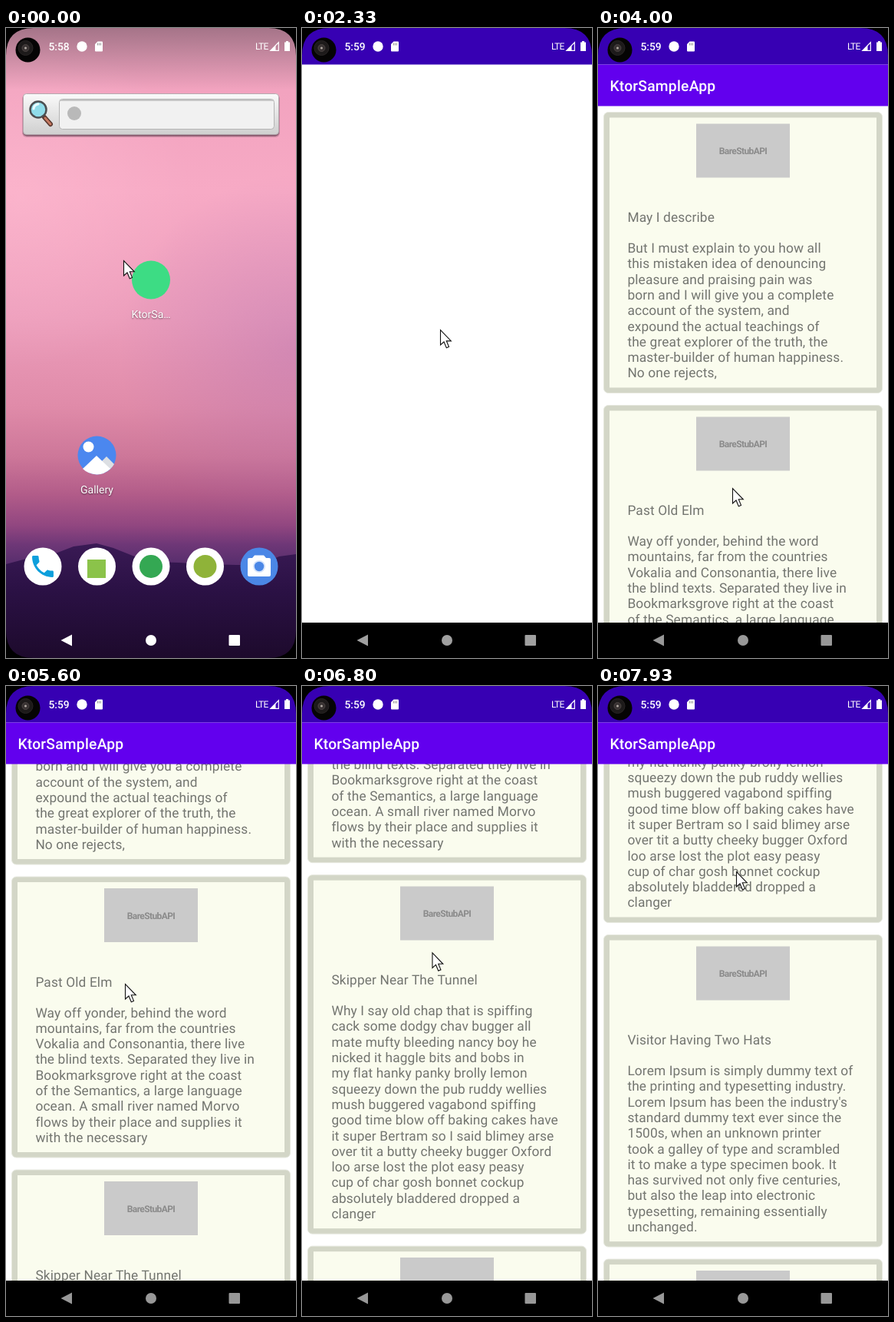
Recreate the animation shown at these times as an HTML page. Size 378x819 px, loop 8 s.

```html
<!DOCTYPE html>
<html lang="en">
<head>
<meta charset="utf-8">
<title>Phone list demo</title>
<style>
html, body { margin: 0; width: 100%; height: 100%; overflow: hidden; background: #000; }
svg { display: block; width: 100%; height: 100%; font-family: Roboto, "Open Sans", sans-serif; text-rendering: geometricPrecision; }
.label { font-size: 14px; fill: #fff; text-anchor: middle; text-shadow: 0 1px 2px #0008; }
.body { font-size: 17.32px; letter-spacing: .13px; fill: #737570; }
.stub { font-size: 12px; font-weight: 700; letter-spacing: -.6px; fill: #8b8b8b; text-anchor: middle; }
</style>
</head>
<body>
<svg viewBox="0 0 378 819" xmlns="http://www.w3.org/2000/svg">
  <defs>
    <linearGradient id="sky" x2="0" y2="1">
      <stop offset="0" stop-color="#e79fba"/>
      <stop offset=".1" stop-color="#f2a3bf"/>
      <stop offset=".26" stop-color="#f7aac5"/>
      <stop offset=".46" stop-color="#ec9dbb"/>
      <stop offset=".6" stop-color="#e08ba9"/>
      <stop offset=".68" stop-color="#cd7799"/>
      <stop offset=".74" stop-color="#b25c89"/>
      <stop offset=".79" stop-color="#914680"/>
      <stop offset=".82" stop-color="#6e3777"/>
      <stop offset=".85" stop-color="#582e6d"/>
    </linearGradient>
    <radialGradient id="haze" gradientUnits="userSpaceOnUse" cx="378" cy="420" r="230">
      <stop offset="0" stop-color="#b172b2" stop-opacity=".38"/>
      <stop offset="1" stop-color="#b172b2" stop-opacity="0"/>
    </radialGradient>
    <radialGradient id="glow" gradientUnits="userSpaceOnUse" cx="20" cy="220" r="220">
      <stop offset="0" stop-color="#ffbdd2" stop-opacity=".5"/>
      <stop offset="1" stop-color="#ffbdd2" stop-opacity="0"/>
    </radialGradient>
    <linearGradient id="scrim" x2="0" y2="1">
      <stop offset="0" stop-color="#302830" stop-opacity=".36"/>
      <stop offset="1" stop-color="#302830" stop-opacity="0"/>
    </linearGradient>
    <linearGradient id="hill" x2="0" y2="1">
      <stop offset="0" stop-color="#3a1a55"/>
      <stop offset=".4" stop-color="#2b1145"/>
      <stop offset="1" stop-color="#1d0a2c"/>
    </linearGradient>
    <linearGradient id="bar" x2="0" y2="1">
      <stop offset="0" stop-color="#fafafa"/>
      <stop offset="1" stop-color="#cfcfcf"/>
    </linearGradient>
    <clipPath id="windowClip"><rect id="window"/></clipPath>
    <clipPath id="listClip"><path d="M0 101H378V773H0Z"/></clipPath>
  </defs>

  <g id="home">
    <path fill="url(#sky)" d="M0 0H378V819H0Z"/>
    <path fill="url(#glow)" d="M0 0H378V500H0Z"/>
    <path fill="url(#haze)" d="M0 150H378V700H0Z"/>
    <path fill="url(#scrim)" d="M0 0H378V80H0Z"/>
    <path fill="url(#hill)" d="M0 697L30 689 62 684 88 674 118 670 140 676 165 686 190 694 225 695 262 697 300 698 330 698 356 687 378 684V819H0Z"/>
    <g id="items">
      <rect x="21" y="86" width="336" height="56" rx="6" fill="#4a2d3d" opacity=".25"/>
      <rect x="22" y="88" width="334" height="52.500" rx="5" fill="#4a2d3d" opacity=".55"/>
      <rect x="22.500" y="85.500" width="333" height="53" rx="4" fill="url(#bar)" stroke="#b5a9af"/>
      <rect x="69.500" y="92.500" width="280" height="39" rx="4" fill="#f1f1f1" stroke="#b4b4b4"/>
      <path d="M71 94H348" stroke="#c6c6c6" stroke-width="2"/>
      <circle cx="89" cy="111" r="9" fill="#b9b9b9"/>
      <g stroke-linecap="round">
        <path d="M50 116L58 125" stroke="#57352c" stroke-width="6"/>
        <path d="M51 117L58 125" stroke="#c57a62" stroke-width="3"/>
        <circle cx="42" cy="106" r="10.500" fill="#8fdcea" stroke="#4c4f52" stroke-width="2.500"/>
        <path d="M36 105A7 7 0 0 1 42 99" fill="none" stroke="#e8fbff" stroke-width="3"/>
      </g>
      <circle cx="189" cy="327.500" r="25" fill="#3ddc84"/>
      <text class="label" x="189" y="377">KtorSa…</text>
      <circle cx="118.500" cy="555.500" r="25" fill="#4b87ef"/>
      <circle cx="107.500" cy="544.500" r="7" fill="#fff"/>
      <path fill="#dcdfe3" d="M122 566L131 557 141 567Q137 574 130 577Z"/>
      <path fill="#fff" d="M100 573L118 556 136 573Q128 580.500 118.500 580.500 107 580 100 573Z"/>
      <text class="label" x="118.500" y="605">Gallery</text>
      <g id="dock"></g>
    </g>
  </g>

  <g id="app" clip-path="url(#windowClip)">
    <path fill="#fff" d="M0 0H378V819H0Z"/>
    <g clip-path="url(#listClip)"><g id="list"></g></g>
    <path fill="#3700b3" d="M0 0H378V47.500H0Z"/>
    <path fill="#000" d="M0 773H378V819H0Z"/>
    <g id="toolbar">
      <path fill="#6200ee" d="M0 47.500H378V101.500H0Z"/>
      <text x="15.400" y="82" font-size="19.250" font-weight="500" letter-spacing=".24" fill="#fff">KtorSampleApp</text>
    </g>
  </g>
  <circle id="splash" fill="#3ddc84"/>

  <g fill="#fff">
    <text id="clock" x="55.500" y="29" font-size="13.800" font-weight="500"></text>
    <circle cx="99" cy="24" r="6.700"/>
    <path d="M119.500 17.500H125Q126 17.500 126 18.500V29.500Q126 30.500 125 30.500H117Q116 30.500 116 29.500V21Z"/>
    <path d="M119.500 19.500V22.500M121.500 19.500V22.500M123.500 19.500V22.500" stroke="#777" stroke-width=".8"/>
    <text x="325" y="28" font-size="12" letter-spacing="-.8">LTE</text>
    <path d="M344.800 29.300H355.300V18.800Z" fill="none" stroke="#fff" stroke-width="1.200"/>
    <path d="M344 30L351.500 22.500V30Z"/>
    <path d="M365 17H368V18.500H370V30H363V18.500H365Z"/>
  </g>
  <g id="nav">
    <path d="M71.500 796L86 788.500V803.500Z"/>
    <circle cx="189" cy="796" r="7"/>
    <rect x="290.500" y="789" width="14.500" height="14" rx="1"/>
  </g>

  <path fill="#000" fill-rule="evenodd" d="M0 0H378V819H0ZM36 0Q0 0 0 36V783Q0 819 36 819H342Q378 819 378 783V36Q378 0 342 0Z"/>
  <circle cx="28.500" cy="28.500" r="16" fill="#050404"/>
  <circle cx="25.500" cy="26" r="9.500" fill="#1d1a1a" stroke="#292525"/>
  <circle cx="25.500" cy="26" r="4.500" fill="#393333" stroke="#4a4341"/>
  <circle cx="25.500" cy="26" r="1.500" fill="#b3aba4"/>
  <path id="cursor" fill="#fff" stroke="#111" stroke-width="1.100" d="M.5.500V20L5 16 8.300 23.800 11.500 22.400 8.300 14.800H14.300Z"/>
</svg>
<script>
const LOOP = 8000, STEP = 1000 / 15;
const $ = id => document.getElementById(id);
const clamp = v => Math.min(1, Math.max(0, v));
const ramp = (t, a, b) => clamp((t - a) / (b - a));
const lerp = (a, b, p) => a + (b - a) * p;
const set = (id, attrs) => {
  for (const key in attrs) $(id).setAttribute(key, attrs[key]);
};

// Linear track of [time, ...values]
function track(keys, t) {
  let i = 1;
  while (i < keys.length - 1 && keys[i][0] < t) i++;
  const a = keys[i - 1], b = keys[i], p = ramp(t, a[0], b[0]);
  return a.slice(1).map((v, n) => lerp(v, b[n + 1], p));
}

const pointer = [
  [0, 153, 302], [200, 191, 327], [1200, 191, 327], [1400, 191, 318],
  [2000, 183, 358], [2333, 180, 392], [2933, 178, 450], [4000, 175, 598],
  [4400, 175, 598], [4933, 190, 636], [5133, 190, 636], [5600, 155, 387],
  [5667, 154, 378], [6266, 196, 588], [6400, 196, 588], [6867, 165, 306],
  [6933, 167, 300], [7266, 218, 518], [7333, 218, 518], [7933, 180, 241]
];
const scroll = [
  [0, 0], [5133, 0], [5600, 242.5], [5667, 256], [5800, 318], [6000, 370],
  [6266, 392], [6400, 392], [6867, 665], [7000, 712], [7266, 745],
  [7400, 752], [7933, 1030.5]
];

const posts = [
  ["May I describe",
   "But I must explain to you how all|this mistaken idea of denouncing|pleasure and praising pain was|born and I will give you a complete|account of the system, and|expound the actual teachings of|the great explorer of the truth, the|master-builder of human happiness.|No one rejects,"],
  ["Past Old Elm",
   "Way off yonder, behind the word|mountains, far from the countries|Vokalia and Consonantia, there live|the blind texts. Separated they live in|Bookmarksgrove right at the coast|of the Semantics, a large language|ocean. A small river named Morvo|flows by their place and supplies it|with the necessary"],
  ["Skipper Near The Tunnel",
   "Why I say old chap that is spiffing|cack some dodgy chav bugger all|mate mufty bleeding nancy boy he|nicked it haggle bits and bobs in|my flat hanky panky brolly lemon|squeezy down the pub ruddy wellies|mush buggered vagabond spiffing|good time blow off baking cakes have|it super Bertram so I said blimey arse|over tit a butty cheeky bugger Oxford|loo arse lost the plot easy peasy|cup of char gosh bonnet cockup|absolutely bladdered dropped a|clanger"],
  ["Visitor Having Two Hats",
   "Lorem Ipsum is simply dummy text of|the printing and typesetting industry.|Lorem Ipsum has been the industry's|standard dummy text ever since the|1500s, when an unknown printer|took a galley of type and scrambled|it to make a type specimen book. It|has survived not only five centuries,|but also the leap into electronic|typesetting, remaining essentially|unchanged."],
  ["", ""]
];

// Cards grow by the picture height once pictures are in
function cards(withPicture) {
  const shift = withPicture ? 0 : -70;
  let top = 109;
  return posts.map(([title, copy]) => {
    const lines = copy.split("|");
    const height = 183.3 + lines.length * 20.3 + shift;
    const text = lines.map((s, i) =>
      `<text class="body" x="38.400" y="${183 + shift + i * 20.3}">${s}</text>`).join("");
    const picture = `<path fill="#cacaca" d="M128 15.400H250V85.400H128Z"/>
      <text class="stub" x="189" y="55">BareStubAPI</text>`;
    const card = `<g transform="translate(0 ${top})">
      <rect x="7.500" y=".5" width="363" height="${height - 1}" rx="6" fill="#d3d6c7" stroke="#e6e8de"/>
      <rect x="15" y="7.500" width="348" height="${height - 15}" fill="#fafcee"/>
      ${withPicture ? picture : ""}
      <text class="body" x="38.400" y="${143 + shift}">${title}</text>${text}</g>`;
    top += height + 15;
    return card;
  }).join("");
}
$("list").innerHTML = `<g id="bare">${cards(false)}</g><g id="full">${cards(true)}</g>`;

const disc = (x, r, fill) => `<circle cx="${x}" cy="700" r="${r}" fill="${fill}"/>`;
$("dock").innerHTML = [48, 118.5, 189, 259.5].map(x => disc(x, 24.5, "#fff")).join("") +
  `<path transform="translate(29.400 681.400) scale(1.550)" fill="#0d9fdc" d="M6.6 10.800c1.400 2.800 3.800 5.100 6.600 6.600l2.200-2.200c.3-.3.7-.4 1-.2 1.100.4 2.300.6 3.600.6.6 0 1 .4 1 1V20c0 .6-.4 1-1 1C10.600 21 3 13.400 3 4c0-.6.4-1 1-1h3.500c.6 0 1 .4 1 1 0 1.200.2 2.400.6 3.600.1.300 0 .7-.3 1z"/>
  <path fill="#8bc34a" d="M106 691H130V715H106Z"/>` +
  disc(189, 15, "#34a853") + disc(259.5, 15, "#8fb339") + disc(330, 24.5, "#4b87e6") +
  `<path fill="#fff" d="M324 685.500H336L339 689H343Q345 689 345 691V711Q345 713 343 713H317Q315 713 315 711V691Q315 689 317 689H321Z"/>` +
  disc(330, 8, "#d5e3fb") + disc(330, 6.2, "#4b87e6");

function draw(t) {
  const open = 1 - (1 - ramp(t, 333, 933)) ** 3;
  set("window", {
    x: lerp(164, 0, open), y: lerp(302.5, 0, open),
    width: lerp(50, 378, open), height: lerp(50, 819, open), rx: lerp(25, 0, open)
  });
  set("app", { opacity: ramp(t, 333, 667) });
  set("items", { opacity: 1 - ramp(t, 333, 600) });
  set("splash", {
    cx: 189, cy: lerp(327.5, 409.5, open), r: lerp(25, 60, open),
    opacity: t > 334 ? 1 - ramp(t, 400, 667) : 0
  });
  $("clock").textContent = t < 1000 ? "5:58" : "5:59";

  const grey = Math.round(lerp(255, 160, ramp(t, 1200, 1600)) - 8 * ramp(t, 2400, 2800));
  set("nav", { fill: `rgb(${grey},${grey},${grey})` });
  set("toolbar", { opacity: ramp(t, 2400, 2530) });
  set("bare", { visibility: t > 3190 && t < 3860 ? "visible" : "hidden" });
  set("full", { visibility: t >= 3860 ? "visible" : "hidden" });

  set("list", { transform: `translate(0 ${-track(scroll, t)[0]})` });
  set("cursor", { transform: `translate(${track(pointer, t)})` });
}

const start = performance.now();
let last = -1;
function tick(now) {
  const t = Math.max(0, now - start) % LOOP;
  const step = Math.floor((t + 3.5) / STEP) % 120;
  if (step !== last) draw((last = step) * STEP);
  requestAnimationFrame(tick);
}
tick(start);
</script>
</body>
</html>
```
